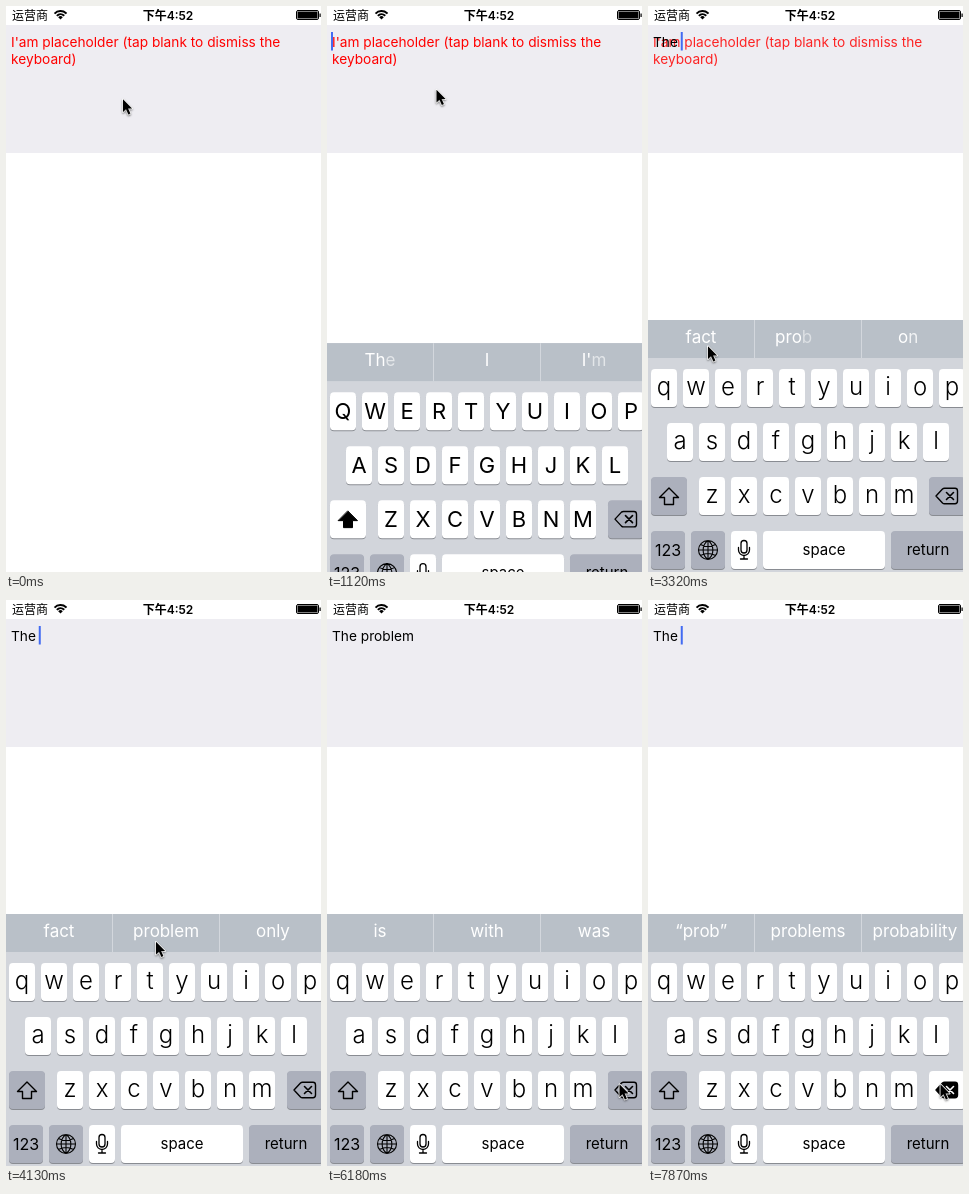
Animation, 315 px wide and 566 px high, one loop 7990 ms. Source, as an HTML page with a canvas:

```html
<!DOCTYPE html>
<html lang="en">
<head>
<meta charset="utf-8">
<title>Text view with placeholder</title>
<style>
html, body { margin: 0; width: 315px; height: 566px; overflow: hidden; background: #fff; }
canvas { display: block; }
</style>
</head>
<body>
<canvas id="stage" width="315" height="566"></canvas>
<script>
const ctx = document.getElementById('stage').getContext('2d');
const LOOP = 7990;
const SANS = 'Inter, "Noto Sans CJK SC", "Noto Sans CJK", sans-serif';
const TEXT_FONT = `13.7px ${SANS}`;

// Pointer tip: time, x, y
const POINTER = [
  [0, 116.5, 92.5], [59, 116.5, 92.5], [60, 116.5, 90.5], [240, 116.5, 90.5],
  [330, 118.5, 91], [530, 109, 83], [1830, 109, 83], [1940, 152.5, 301.5],
  [2150, 174, 318], [2570, 59.5, 339.5], [3450, 59.5, 339.5], [3840, 149.5, 341],
  [5130, 149.5, 341], [5770, 290.5, 482.5], [5830, 292, 483.5]
];

// Suggestions: time they start to appear, words, delay of each slot
const LAG = [0, 90, 102];
const HINTS = [
  [1016, ['The', 'I', "I'm"], [0, 0, 0]],
  [3160, ['fact', 'problem', 'only'], LAG],
  [4550, ['is', 'with', 'was'], LAG],
  [6430, ['“problem”', 'problems', 'problematic'], LAG],
  [6800, ['“proble”', 'problem', 'problems'], LAG],
  [7250, ['“prob”', 'problems', 'probability'], LAG]
];

const FULL = 'The problem ';
const DELETES = [6240, 6440, 6640, 6840, 7040, 7270, 7630, 7870];
const TYPED = [[1005, ''], [3170, 'The '], [4490, FULL],
  ...DELETES.map((t, i) => [t, FULL.slice(0, -1 - i)])];

const clamp = v => Math.max(0, Math.min(1, v));
const latest = (list, t) => list.filter(e => e[0] <= t).pop();

function text(str, x, y, font, color, align = 'left') {
  ctx.font = font;
  ctx.fillStyle = color;
  ctx.textAlign = align;
  ctx.fillText(str, x, y);
}

function rect(x, y, w, h, color) {
  ctx.fillStyle = color;
  ctx.fillRect(x, y, w, h);
}

function round(x, y, w, h, r, color) {
  ctx.beginPath();
  ctx.roundRect(x, y, w, h, r);
  ctx.fillStyle = color;
  ctx.fill();
}

function shape(d, fill, stroke, width = 1.4) {
  const path = new Path2D(d);
  ctx.lineWidth = width;
  ctx.lineJoin = ctx.lineCap = 'round';
  if (stroke) { ctx.strokeStyle = stroke; ctx.stroke(path); }
  if (fill) { ctx.fillStyle = fill; ctx.fill(path); }
}

function statusBar() {
  text('运营商', 6, 13.5, `12px ${SANS}`, '#000');
  text('下午4:52', 162, 13.5, `600 12px ${SANS}`, '#000', 'center');
  ctx.strokeStyle = '#000';
  ctx.lineWidth = 1.9;
  ctx.lineCap = 'butt';
  for (const r of [5, 8.2]) {
    ctx.beginPath();
    ctx.arc(54.5, 13.2, r, -Math.PI * .76, -Math.PI * .24);
    ctx.stroke();
  }
  shape('M54.5 13.6L52.2 11.2A3.2 3.2 0 0 1 56.8 11.2Z', '#000');
  ctx.lineWidth = 1;
  ctx.beginPath();
  ctx.roundRect(290.5, 4.5, 22, 9, 1.5);
  ctx.stroke();
  round(291.5, 5.5, 20, 7, .5, '#000');
  rect(313.5, 7.5, 1.2, 3.5, '#000');
}

function textView(t) {
  rect(0, 19, 315, 128, '#eeedf2');
  ctx.globalAlpha = 1 - clamp((t - 3230) / 610);
  text("I'am placeholder (tap blank to dismiss the", 5, 40.5, TEXT_FONT, '#f00');
  text('keyboard)', 5, 57.5, TEXT_FONT, '#f00');
  ctx.globalAlpha = 1;
  const entry = latest(TYPED, t);
  if (!entry) return;
  text(entry[1], 5, 40.5, TEXT_FONT, '#000');
  const phase = (t - entry[0]) % 1000;
  ctx.globalAlpha = phase < 900 ? 1 - clamp((phase - 500) / 70) : clamp((phase - 900) / 60);
  rect(4 + ctx.measureText(entry[1]).width, 26, 2, 18.5, '#426bf2');
  ctx.globalAlpha = 1;
}

function hintBar(t) {
  rect(0, 314, 315, 38, '#b9c0c8');
  rect(106, 314, 1, 38, '#d3d7dd');
  rect(213, 314, 1, 38, '#d3d7dd');
  const next = HINTS.findIndex(h => t < h[0]);
  const current = HINTS[(next < 0 ? HINTS.length : next) - 1];
  if (!current) return;
  const [start, words, lag] = current;
  const fade = next < 0 ? 1 : clamp((HINTS[next][0] - t) / 120);
  const font = `17px ${SANS}`;
  words.forEach((word, slot) => {
    ctx.font = font;
    const left = 53 + slot * 107 - ctx.measureText(word).width / 2;
    const shown = clamp((t - start - lag[slot]) / 160) * (word.length + 1);
    [...word].forEach((ch, i) => {
      ctx.globalAlpha = clamp(shown - i) * fade;
      text(ch, left + ctx.measureText(word.slice(0, i)).width, 337, font, '#fff');
    });
  });
  ctx.globalAlpha = 1;
}

function key(x, y, w, color = '#fff') {
  round(x, y + 1, w, 38, 4, '#898c92');
  round(x, y, w, 38, 4, color);
}

function letterRow(row, x, y, lower) {
  [...row].forEach((ch, i) => {
    key(x + i * 32, y, 26);
    text(lower ? ch.toLowerCase() : ch, x + 13 + i * 32, y + (lower ? 25.5 : 27),
      lower ? `300 24px ${SANS}` : `22px ${SANS}`, '#000', 'center');
  });
}

function keyboard(t) {
  const gray = '#acb0bc';
  const lower = t >= 3170;
  const pressed = t >= 7630 || DELETES.some(d => t >= d - 30 && t < d + 90);
  ctx.save();
  ctx.translate(0, t > 1450 ? 0 : 252 * Math.exp((960 - t) / 67));
  rect(0, 314, 315, 252, '#d2d5db');
  hintBar(t);
  letterRow('QWERTYUIOP', 3, 363, lower);
  letterRow('ASDFGHJKL', 19, 417, lower);
  letterRow('ZXCVBNM', 51, 471, lower);

  key(3, 471, 36, lower ? gray : '#fff');
  shape('M21 482L30.5 491.5H25.5V498.5H16.5V491.5H11.5Z', lower ? null : '#000', '#000', lower ? 1.4 : 1);
  key(281, 471, 36, pressed ? '#fff' : gray);
  shape('M288 490L294.5 483Q295.3 482.3 296.5 482.3H307Q309.5 482.3 309.5 485V495Q309.5 497.7 307 497.7H296.5Q295.3 497.7 294.5 497Z',
    pressed ? '#000' : null, '#000');
  shape('M298.5 486.5L305.5 493.5M305.5 486.5L298.5 493.5', null, pressed ? '#fff' : '#000', 1.6);

  key(3, 525, 34, gray);
  text('123', 20, 550, `16px ${SANS}`, '#000', 'center');
  key(43, 525, 34, gray);
  shape('M50.5 544a9.5 9.5 0 1 0 19 0a9.5 9.5 0 1 0-19 0M50.5 544H69.5M60 534.5V553.5' +
    'M60 534.5C53.5 539 53.5 549 60 553.5M60 534.5C66.5 539 66.5 549 60 553.5' +
    'M52.5 538.5Q60 542.5 67.5 538.5M52.5 549.5Q60 545.5 67.5 549.5', null, '#000', 1.1);
  key(83, 525, 26);
  shape('M93 537.5a3 3 0 0 1 6 0V544a3 3 0 0 1-6 0ZM90.5 541.5V544a5.5 5.5 0 0 0 11 0V541.5M96 549.5V553M92.5 553H99.5',
    null, '#000', 1.3);
  key(115, 525, 122);
  text('space', 176, 549, `15px ${SANS}`, '#000', 'center');
  key(243, 525, 74, gray);
  text('return', 280, 549, `15px ${SANS}`, '#000', 'center');
  ctx.restore();
}

function pointer(t) {
  const a = latest(POINTER, t);
  const b = POINTER[POINTER.indexOf(a) + 1] || a;
  const p = b === a ? 0 : (t - a[0]) / (b[0] - a[0]);
  const ease = p * p * (3 - 2 * p);
  ctx.save();
  ctx.translate(a[1] + (b[1] - a[1]) * ease, a[2] + (b[2] - a[2]) * ease);
  ctx.shadowColor = 'rgba(0,0,0,.35)';
  ctx.shadowBlur = 2;
  ctx.shadowOffsetY = 1;
  const arrow = 'M.5 .8V13.6L3.5 10.8L5.9 16L7.9 15.1L5.6 10.1H9.6Z';
  shape(arrow, '#fff', '#fff', 1.8);
  ctx.shadowColor = 'transparent';
  shape(arrow, '#000');
  ctx.restore();
}

function draw(now) {
  const t = now % LOOP;
  rect(0, 0, 315, 566, '#fff');
  statusBar();
  textView(t);
  if (t >= 1000) keyboard(t);
  pointer(t);
}

let begin;
function tick(now) {
  begin ??= now;
  draw(now - begin);
  requestAnimationFrame(tick);
}
draw(0);
requestAnimationFrame(tick);
</script>
</body>
</html>
```
